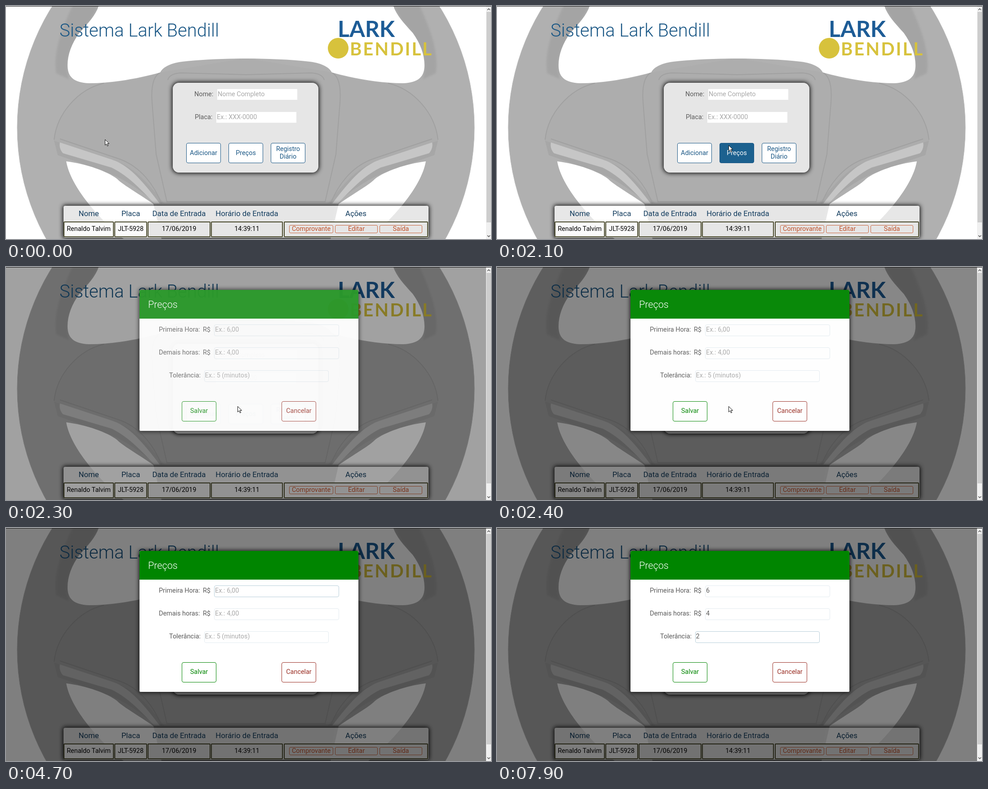
Animation, 1079 px wide and 519 px high, one loop 8000 ms. Source, as an HTML page:

```html
<!DOCTYPE html>
<html lang="pt-BR">
<head>
<meta charset="utf-8">
<title>Controle de vagas</title>
<style>
html, body { margin: 0; width: 100%; height: 100%; overflow: hidden; background: #fff; }
#stage { position: absolute; left: 0; top: 0; width: 1079px; height: 519px; overflow: hidden; font: 14.4px Roboto, sans-serif; }
#stage div { position: absolute; box-sizing: border-box; white-space: nowrap; }
#stage svg { position: absolute; left: 0; top: 0; }
.layer { left: 0; top: 0; width: 1068px; height: 519px; overflow: hidden; }
.panel { background: rgba(255, 255, 255, .7); box-shadow: 0 0 10px 2px rgba(0, 0, 0, .85); }
.btn { border: 1px solid; border-radius: 4px; background: #fff; }
.cell { border: 2px solid #48482a; border-radius: 2px; }
.act { border: 1px solid #c9653f; border-radius: 3px; }
.field { border: 1px solid #e3ebf0; border-radius: 4px; background: #fff; }
</style>
</head>
<body>
<div id="stage">
  <svg width="1068" height="519" viewBox="0 0 1068 519">
    <defs>
      <filter id="soft"><feGaussianBlur stdDeviation="2"/></filter>
      <g id="half">
        <path fill="#a4a4a4" filter="url(#soft)" d="M150 -5C124 50 104 105 112 150L140 163C128 115 150 75 188 32L208 -5Z"/>
        <path fill="#adadad" d="M107 300C113 240 160 185 218 172C270 169 310 160 343 148L534 116V519H350L335 440C300 412 270 390 235 375L115 332Z"/>
        <path fill="#a7a7a7" d="M107 300L250 348C290 363 320 400 352 440H335C300 412 270 390 235 375L115 332Z"/>
        <path fill="none" stroke="#a0a0a0" stroke-width="2" d="M107 298C113 240 160 185 218 172M120 296L250 340C300 357 330 400 346 440M343 148C330 155 322 175 325 215L334 330L358 436H534M360 165C362 156 372 150 390 149L534 153"/>
        <path fill="#c6c6c6" d="M120 304L235 342C272 354 300 385 342 440H330C300 408 270 377 235 360L127 328C121 322 118 312 120 304Z"/>
        <path fill="#fff" d="M534 -2H207C200 20 183 38 163 60C146 84 137 108 137 132C137 157 150 171 185 172C240 172 300 160 343 148C348 138 362 128 392 124C435 119 490 117 534 117Z"/>
        <path fill="#fff" d="M134 346C180 352 225 368 247 385C258 397 290 415 328 441L346 519H262C222 487 145 410 134 346Z"/>
      </g>
    </defs>
    <circle cx="533.5" cy="271" r="508.5" fill="#b0b0b0" stroke="#bdbdbd" stroke-width="1"/>
    <use href="#half"/>
    <use href="#half" transform="matrix(-1 0 0 1 1068 0)"/>
  </svg>
  <div id="page" class="layer"></div>
  <div id="shade" class="layer" style="background:#000"></div>
  <div id="backing" class="layer"></div>
  <div id="modal" class="layer"></div>
  <div id="bar" style="left:1068px;top:0;width:11px;height:519px;background:#f0f0f0">
    <div style="left:1px;top:13px;width:10px;height:469px;background:#cdcdcd"></div>
    <svg width="11" height="519" fill="none" stroke="#555" stroke-width="1.5"><path d="M3 9L6 6L9 9M3 511L6 514L9 511"/></svg>
  </div>
  <div style="left:0;top:0;width:1079px;height:1px;background:#151515"></div>
  <svg id="cursor" width="14" height="20"><path d="M.5 .5V13L3.5 10.2L5.6 15L7.6 14.1L5.5 9.5H9.5Z" fill="#fff" stroke="#111"/></svg>
</div>
<script>
const LOOP = 8000, STEP = 100;
const $ = id => document.getElementById(id);
const page = $('page'), modal = $('modal'), backing = $('backing'), shade = $('shade'), cursor = $('cursor');

function box(parent, cls, x, y, w, h, css = '') {
  const el = document.createElement('div');
  el.className = cls;
  el.style.cssText = `left:${x}px;top:${y}px;width:${w}px;height:${h}px;${css}`;
  return parent.appendChild(el);
}

// cy is the middle of the capitals; with mid set, x is the centre of the line.
function text(parent, str, x, cy, color, mid = false, css = '') {
  const el = document.createElement('div');
  el.textContent = str;
  el.style.cssText = `left:${x}px;top:${cy - 25}px;line-height:50px;color:${color};${mid ? 'transform:translateX(-50%);' : ''}${css}`;
  return parent.appendChild(el);
}

function button(parent, label, x, y, color) {
  const el = box(parent, 'btn', x, y, 77, 45, `border-color:${color}`);
  const lines = label.split('\n');
  const labels = lines.map((s, i) =>
    text(parent, s, x + 38.5, y + 22.5 + (i - (lines.length - 1) / 2) * 16.5, color, true));
  return { el, label: labels[0] };
}

// Header and logo stand-in
const NAVY = '#1a5785', GOLD = '#d7c23c', INK = '#5a5a5a', HINT = '#a8a8a8';
text(page, 'Sistema Lark Bendill', 119, 55, NAVY, false, 'font-size:40px;font-weight:300');
box(page, '', 716, 71, 46, 46, `border-radius:50%;background:${GOLD}`);
text(page, 'LARK', 738, 50, '#1d5c96', false, 'font:700 50px/50px Lato,sans-serif');
text(page, 'BENDILL', 765, 95, GOLD, false, 'font:700 40px/50px Lato,sans-serif;letter-spacing:3px');

// Entry form
box(page, 'panel', 371, 171, 324, 200, 'border-radius:14px');
[['Nome:', 419, 197, 'Nome Completo', 470], ['Placa:', 420, 248, 'Ex.: XXX-0000', 468]].forEach(([label, x, cy, hint, fx]) => {
  text(page, label, x, cy, INK);
  box(page, '', fx, cy - 12, 178, 24, 'background:#fff');
  text(page, hint, fx + 1, cy, HINT);
});
button(page, 'Adicionar', 401, 305, NAVY);
const prices = button(page, 'Preços', 495, 305, NAVY);
button(page, 'Registro\nDiário', 589, 305, NAVY);

// Table
const PALE = '#fafafa', GREY = '#e6e6e6';
box(page, 'panel', 128, 445, 812, 71, 'border-radius:4px');
[
  ['Nome', 'Renaldo Talvim', 128, 112, PALE], ['Placa', 'JLT-5928', 241, 73, PALE],
  ['Data de Entrada', '17/06/2019', 315, 140, GREY], ['Horário de Entrada', '14:39:11', 456, 160, GREY],
  ['Ações', '', 618, 321, GREY]
].forEach(([head, value, x, w, fill]) => {
  text(page, head, x + w / 2, 462, '#123c5e', true, 'font-size:16.8px');
  box(page, 'cell', x, 480, w, 35, `background:${fill}`);
  text(page, value, x + w / 2, 497, '#000', true);
});
[['Comprovante', 630, 98], ['Editar', 732, 95], ['Saída', 831, 95]].forEach(([label, x, w]) => {
  box(page, 'act', x, 488, w, 18);
  text(page, label, x + w / 2, 497, '#c0502a', true);
});

// Price dialog: a white frame with the content as a second white sheet above it
const sheet = [297, 51, 487, 314];
box(backing, '', ...sheet, 'background:#fff;border-radius:3px;box-shadow:0 0 9px 2px rgba(0,0,0,.7)');
box(modal, '', ...sheet, 'background:#fff;border-radius:3px');
box(modal, '', 297, 51, 487, 64, 'background:#008500;border-radius:3px 3px 0 0');
text(modal, 'Preços', 316, 84, '#fff', false, 'font-size:21.6px;font-weight:300');
const fields = [
  { label: 'Primeira Hora:', lx: 340, cy: 140, x: 463, hint: 'Ex.: 6,00', value: '6', typed: 5000, focus: [3000, 3300], blur: [5200, 5500], money: true },
  { label: 'Demais horas:', lx: 340, cy: 191, x: 463, hint: 'Ex.: 4,00', value: '4', typed: 6500, focus: [5200, 5500], blur: [6800, 7000], money: true },
  { label: 'Tolerância:', lx: 363, cy: 242, x: 440.5, hint: 'Ex.: 5 (minutos)', value: '2', typed: 7700, focus: [6800, 7000] }
];
for (const f of fields) {
  text(modal, f.label, f.lx, f.cy, INK);
  if (f.money) text(modal, 'R$', 438, f.cy, INK);
  f.el = box(modal, 'field', f.x, f.cy - 12.5, 277.5, 26);
  f.text = text(modal, f.hint, f.x + 2, f.cy, HINT);
}
button(modal, 'Salvar', 391, 298.5, '#008500');
button(modal, 'Cancelar', 613, 298.5, '#992c22');
const caret = box(modal, '', 0, 0, 1, 17, 'background:#333');

// x, y, on, off
const carets = [
  [465, 131, 3300, 3800], [465, 131, 4200, 4700], [473, 131, 5000, 5500], [473, 131, 5700, 5900],
  [465, 182, 5900, 6300], [473, 182, 6500, 6800], [443, 233, 6900, 7400], [451, 233, 7700, 7900]
];
// time, shade opacity, dialog opacity
const fade = [[0, 0, 0], [2200, .09, .2], [2300, .37, .8], [2400, .47, .96], [2500, .5, 1]];
// time, x, y
const path = [[100, 220, 297], [800, 486, 316], [900, 486, 316], [1300, 515, 310], [2800, 515, 310], [3200, 545, 145]];

const clamp = v => Math.max(0, Math.min(1, v));
// Reaches its first change on the step at a and is complete on the step at b.
const ramp = (t, [a, b]) => clamp((t - a + STEP) / (b - a + STEP));
const mix = (a, b, p) => `rgb(${a.map((v, i) => Math.round(v + (b[i] - v) * p))})`;

function pointer(t) {
  let i = 0;
  while (i < path.length - 2 && t >= path[i + 1][0]) i++;
  const [t0, x0, y0] = path[i], [t1, x1, y1] = path[i + 1];
  const p = clamp((t - t0) / (t1 - t0)), e = p * p * (3 - 2 * p);
  return [x0 + (x1 - x0) * e, y0 + (y1 - y0) * e];
}

function draw(time) {
  const t = Math.floor(time / STEP) * STEP;
  const [, dark, show] = fade.filter(k => k[0] <= t).pop();
  shade.style.opacity = dark;
  backing.style.opacity = modal.style.opacity = show;

  const hover = t < 2200 ? ramp(t, [1000, 1300]) : 0;
  prices.el.style.background = mix([255, 255, 255], [28, 97, 143], hover);
  prices.label.style.color = mix([26, 87, 133], [255, 255, 255], hover);

  const [x, y] = pointer(t);
  cursor.style.transform = `translate(${Math.round(x)}px,${Math.round(y)}px)`;
  cursor.style.visibility = t < 3200 ? 'visible' : 'hidden';

  for (const f of fields) {
    const level = ramp(t, f.focus) - (f.blur ? ramp(t, f.blur) : 0);
    const done = t >= f.typed;
    f.el.style.borderColor = mix([227, 235, 240], [184, 207, 218], level);
    f.text.textContent = done ? f.value : f.hint;
    f.text.style.color = done ? INK : HINT;
  }

  const c = carets.find(k => t >= k[2] && t < k[3]);
  caret.style.visibility = c ? 'visible' : 'hidden';
  if (c) {
    caret.style.left = c[0] + 'px';
    caret.style.top = c[1] + 'px';
  }
}

const start = performance.now();
function tick() {
  draw((performance.now() - start) % LOOP);
  requestAnimationFrame(tick);
}
tick();
</script>
</body>
</html>
```
